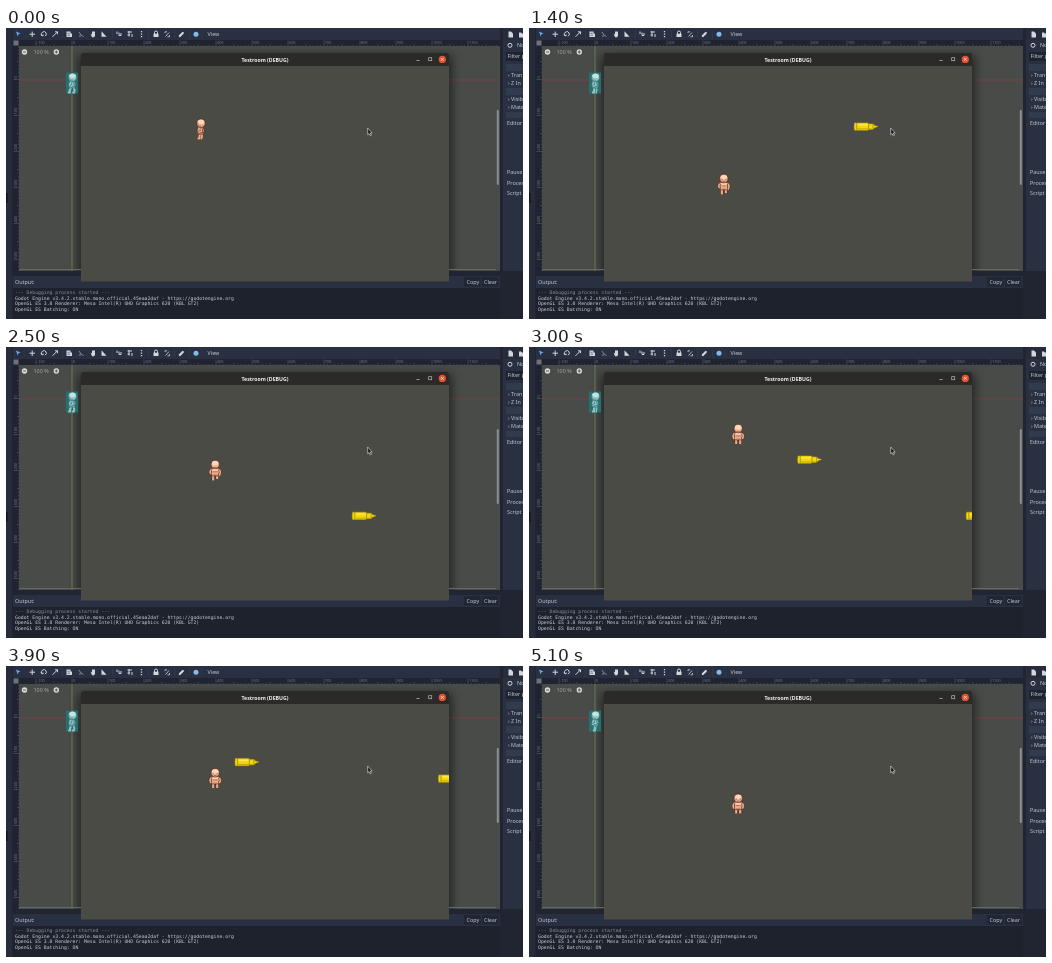
An HTML page that plays this animation: 517 px wide and 291 px high, repeating every 5.3 s.

```html
<!DOCTYPE html>
<html lang="en">
<head>
<meta charset="utf-8">
<title>Debug run</title>
<style>
  html, body { margin: 0; width: 100%; height: 100%; overflow: hidden; background: #202531; }
  svg { display: block; width: 517px; height: 291px; }
  text { font: 5.4px "Noto Sans", sans-serif; fill: #c4c8d0; white-space: pre; }
  .title { font-weight: 700; font-size: 5.2px; fill: #f4f4f2; text-anchor: middle; }
  .log text { font: 4.79px "DejaVu Sans Mono", monospace; fill: #c9ccd3; }
  .ruler text { font-size: 3.8px; fill: #747984; }
  .zoom { fill: #a3a6a4; }
  .icon { fill: none; stroke: #d3d6dc; stroke-width: 1; }
  .solid { fill: #d3d6dc; stroke: none; }
</style>
</head>
<body>
<svg viewBox="0 0 517 291">
  <defs>
    <filter id="blur" x="-20%" y="-20%" width="140%" height="140%"><feGaussianBlur stdDeviation="5"/></filter>
    <clipPath id="view"><rect x="13" y="18" width="481" height="225"/></clipPath>
    <clipPath id="game"><rect x="75" y="38" width="368" height="215.500"/></clipPath>
    <g id="bullet">
      <path d="M-11.500-3.600H1.500L3-2.600H7L8.500-1 12 0 8.500 1.200 7 2.800H3L1.500 3.700H-11.500Q-12.300 0-11.500-3.600Z" fill="#f2d80a" stroke="#c2a208" stroke-width=".5"/>
      <path d="M-8.500-1.700H1.500" stroke="#fff05c"/>
      <path d="M-8.500 2.400H6" stroke="#c7a60a"/>
      <path d="M-9.300-3.500V3.500M2.500-2.800V3M7-2.400V2.600" stroke="#9a8108" stroke-width=".7"/>
    </g>
  </defs>

  <rect width="517" height="291" fill="#202531"/>
  <rect width="6" height="291" fill="#262c3b"/>
  <rect y="165" width="1.500" height="10" fill="#11141b"/>
  <rect x="7" width="487" height="12" fill="#293042"/>

  <g class="icon">
    <path d="M10 3.500 14.500 5.500 12.500 6.300 11.700 8.500Z" fill="#6aa8ef" stroke="none"/>
    <path d="M23.500 6.200H29M26.200 3.500V9"/>
    <path d="M36 7.500A2.400 2.400 0 1 1 39 8.200M35 6.200 36 8 37.800 7"/>
    <path d="M46.500 8.800 51.500 3.800M49 3.800H51.500V6.200"/>
    <path class="solid" d="M60.500 3.500H64.500V5.500H66V9H60.500Z"/>
    <path d="M61.500 5.300H63.500M61.500 7.200H64" stroke="#293042" stroke-width=".6"/>
    <path d="M73 4 75 7 77.500 8.500M73 8H75" stroke="#858b98"/>
    <path class="solid" d="M84.500 5.500 86 6.500V3.500H89V8L88 9.300H86Z"/>
    <path class="solid" d="M95.500 3.300 100.500 8.800H95.500Z"/>
    <path d="M111 3.500V6M113 4.500V7.500H115V5"/>
    <path d="M121.500 4H126M121.500 7H124M123 3V8.500M126 6V9"/>
    <path d="M135.500 3V9.500" stroke-width="1.300" stroke-dasharray="1.300 1.200"/>
    <path d="M148.500 6V4.500A1.500 1.500 0 0 1 151.500 4.500V6"/>
    <rect class="solid" x="147.500" y="5.700" width="5" height="3.300"/>
    <path d="M159 5V3.800H161M163.500 7V8.800H161.500M159.500 8.500 163 4.500" stroke="#aeb3bd"/>
    <path d="M173.800 8 176.800 5" stroke-width="2.200" stroke-linecap="round"/>
    <circle cx="190" cy="6.200" r="2.500" fill="#87b9e8" stroke="none"/>
    <path d="M56.500 2V10M106.500 2V10M142.500 2V10M168.500 2V10M183.500 2V10M196 2V10" stroke="#363e50" stroke-width=".6"/>
  </g>
  <text x="201.500" y="8">View</text>

  <rect x="7" y="12" width="487" height="231" fill="#1f2430"/>
  <rect x="13" y="18" width="481" height="225" fill="#484b47"/>
  <g class="ruler" id="ruler"></g>
  <rect x="7.500" y="12.500" width="5" height="5" fill="#6c717b"/>
  <g clip-path="url(#view)">
    <path d="M13 52H494" stroke="#843f43" stroke-width=".8"/>
    <path d="M66 18V243" stroke="#737d50" stroke-width="1"/>
    <rect x="72" y="27" width="374" height="232" fill="#000" opacity=".5" filter="url(#blur)"/>
  </g>
  <g fill="#d9dbd9">
    <circle cx="18.500" cy="24" r="2.700"/><circle cx="50.300" cy="24" r="2.700"/>
  </g>
  <path d="M17 24H20M48.800 24H51.800M50.300 22.500V25.500" stroke="#3c3e3b" stroke-width=".8"/>
  <text class="zoom" x="27.500" y="26">100 %</text>
  <rect x="490.800" y="82" width="2" height="75" rx="1" fill="#8d9092"/>
  <path d="M13 241.500H490" stroke="#656864" stroke-width="1"/>
  <rect x="60" y="44.500" width="12" height="21" fill="#286f72"/>
  <g id="preview" transform="translate(66 55)"></g>

  <g id="inspector">
    <rect x="497" width="20" height="243" fill="#262c3b"/>
    <rect x="497" y="12" width="20" height="231" fill="#293042"/>
    <rect x="500" y="24" width="17" height="9" fill="#1e2330"/>
    <rect x="500" y="36" width="17" height="7" fill="#323a4e"/>
    <rect x="500" y="60" width="17" height="7" fill="#323a4e"/>
    <rect x="500" y="84" width="17" height="6" fill="#323a4e"/>
    <path class="solid" d="M502.500 3.500H505L507 5.500V9.500H502.500Z"/>
    <path class="solid" d="M513 4.500H515L516 5.500H517V9.500H513Z"/>
    <circle class="icon" cx="504" cy="17.300" r="2"/>
  </g>

  <rect x="7" y="248" width="487" height="43" fill="#293042"/>
  <rect x="7" y="260" width="487" height="31" fill="#1d222d"/>
  <rect x="458" y="249" width="16.500" height="9.500" fill="#202634"/>
  <rect x="476" y="249" width="16.500" height="9.500" fill="#202634"/>
  <text x="9" y="256">Output:</text>
  <text x="460.500" y="256">Copy</text>
  <text x="478" y="256">Clear</text>
  <g class="log" id="log"></g>

  <rect x="75" y="25" width="368" height="228.500" fill="#4b4b45"/>
  <path d="M75 38V27Q75 25 77 25H441Q443 25 443 27V38Z" fill="#2b2a29"/>
  <text class="title" x="259" y="33.500">Testroom (DEBUG)</text>
  <path d="M410.500 32.500H413.500" stroke="#b9b9b7" stroke-width=".8"/>
  <rect x="422.700" y="29.700" width="3" height="3" fill="none" stroke="#b9b9b7" stroke-width=".7"/>
  <circle cx="436.300" cy="31.400" r="3.600" fill="#e55430"/>
  <path d="M435 30.100 437.600 32.700M437.600 30.100 435 32.700" stroke="#fff" stroke-width=".7"/>
  <g clip-path="url(#game)">
    <g id="player"></g>
    <g id="shots"></g>
  </g>
  <path d="M361.700 100V106.700L363.100 105.500 364.200 107.900 365.300 107.400 364.300 105.100H366.200Z" fill="#171717" stroke="#e8e8e8" stroke-width=".6"/>
</svg>

<script>
const LOOP = 5300, STEP = 100, LAST = 5100;
const SHOT_SPEED = 0.182;
const $ = id => document.getElementById(id);

// time, x, y
const path = [
  [0, 194.5, 101], [650, 194.5, 101], [1660, 195, 175.5], [1800, 204, 171.2],
  [1900, 209.2, 166.3], [3075, 209.2, 82], [3470, 209.2, 82], [4260, 209.2, 138], [LOOP, 209.2, 138]
];
// time, view
const views = [[0, 'side'], [650, 'front'], [1850, 'back'], [3470, 'front']];
// time fired, x, y
const shots = [[617, 194.5, 98.5], [1604, 195, 168.8], [2608, 209.2, 112.5], [3726, 209.2, 96]];

const flesh = { skin: '#e9aa88', light: '#ffd8bb', shade: '#a9604c', line: '#4a231b' };
const pale = { skin: '#8fc4c3', light: '#c6e4df', shade: '#559a9c', line: '#286165' };

function labels(group, rows) {
  group.insertAdjacentHTML('beforeend',
    rows.map(([x, y, s]) => `<text x="${x}" y="${y}">${s}</text>`).join(''));
}

function buildRulers() {
  let marks = '', out = '';
  for (let i = -10; i <= 120; i++) {
    const x = 66 + i * 3.6, y = 51.5 + i * 3.6, major = i % 10 === 0;
    const len = major ? 5.5 : i % 5 ? 1 : 2;
    if (x > 13 && x < 494) marks += `M${x} 18v${-len}`;
    if (y > 18 && y < 243) marks += `M13 ${y}h${-len}`;
    if (!major) continue;
    if (x > 13 && x < 485) out += `<text x="${x + 1}" y="16">${i * 10}</text>`;
    if (y > 18 && y < 243) out += `<text transform="translate(11 ${y - 1}) rotate(-90)">${i * 10}</text>`;
  }
  $('ruler').innerHTML = `<path d="${marks}" stroke="#626873" stroke-width=".5"/>${out}`;
}

function buildText() {
  labels($('inspector'), [
    [511, 19, 'No'], [501.5, 30.3, 'Filter p'], [502, 49.4, '› Tran'], [502, 57.4, '› Z In'],
    [502, 73.2, '› Visib'], [502, 81.2, '› Mate'], [501, 97, 'Editor'],
    [501, 146, 'Pause'], [501, 156.5, 'Process'], [501, 167, 'Script']
  ]);
  labels($('log'), [
    [9, 266, '--- Debugging process started ---'],
    [9, 271.6, 'Godot Engine v3.4.2.stable.mono.official.45eaa2daf - https://godotengine.org'],
    [9, 277.2, 'OpenGL ES 3.0 Renderer: Mesa Intel(R) UHD Graphics 620 (KBL GT2)'],
    [9, 282.8, 'OpenGL ES Batching: ON']
  ]);
  $('log').firstChild.style.fill = '#878c98';
}

const stroke = (d, color, w) => `<path d="${d}" fill="none" stroke="${color}" stroke-width="${w}"/>`;
const limb = (d, c, w) => stroke(d, c.line, w + .8) + stroke(d, c.skin, w);
const shape = (d, c) => `<path d="${d}" fill="${c.skin}" stroke="${c.line}" stroke-width=".6"/>`;
const head = (x, c) =>
  `<ellipse cx="${x}" cy="-5.800" rx="4.200" ry="4.300" fill="${c.skin}" stroke="${c.line}" stroke-width=".6"/>` +
  `<ellipse cx="${x}" cy="-7" rx="3.200" ry="2.300" fill="${c.light}"/>`;

// swing runs from -1 to 1
function sideFigure(swing, c) {
  const s = swing * 1.2;
  return limb(`M1 4L${1.5 + s} 7 ${1 + s} 9.500h-2`, c, 2) +
    limb(`M-.5 4L${-1 - s} 7 ${-1 - s} 9.500h-2`, c, 2.2) +
    shape('M-2.500-2H2L3.800 1 2.800 5H-2.500L-3.500 2Z', c) +
    stroke('M2 0 2.500 4H-2', c.shade, 1.2) +
    limb(`M.5-.5L1 2.300 ${-2.500 + s} 3.500`, c, 1.8) +
    head(.5, c) + stroke('M-2.300-5.800v1.300M-2.500-2.800H1', c.shade, .9);
}

function walkFigure(view, swing, c) {
  const s = swing * .8;
  const face = view === 'back' ? 'M-2.500-2.600H2.500' : 'M-1.900-5.600v1.300M1.900-5.600v1.300M-1.300-2.900H1.300';
  return limb(`M-2 4V${9.5 + s}`, c, 2.2) + limb(`M2 4V${9.5 - s}`, c, 2.2) +
    shape('M-4.500-2H4.500L4 2 3.500 5.500H-3.500L-4 2Z', c) +
    limb(`M-4.300-.8L-5.200 2-4.200 ${4.6 - s}`, c, 1.7) +
    limb(`M4.300-.8L5.200 2 4.200 ${4.6 + s}`, c, 1.7) +
    stroke('M-2.500-.3H2.500', c.light, 1.5) + stroke('M-2.300 1.500H2.300M-1.800 4.800H1.800', c.shade, .7) +
    head(0, c) + stroke(face, c.shade, .9);
}

function positionAt(t) {
  const i = path.findIndex(p => p[0] > t);
  const [t0, x0, y0] = path[i - 1], [t1, x1, y1] = path[i];
  const k = (t - t0) / (t1 - t0);
  return { x: x0 + (x1 - x0) * k, y: y0 + (y1 - y0) * k, moving: x0 !== x1 || y0 !== y1 };
}

function draw(t) {
  const { x, y, moving } = positionAt(t);
  const view = views.filter(v => v[0] <= t).pop()[1];
  const swing = Math.round(Math.sin(t / 600 * Math.PI * 2));
  $('player').setAttribute('transform', `translate(${x} ${y})`);
  $('player').innerHTML = view === 'side'
    ? sideFigure(swing, flesh)
    : walkFigure(view, moving ? swing : 0, flesh);
  $('preview').innerHTML = sideFigure(Math.cos(t / 800 * Math.PI * 2), pale);
  $('shots').innerHTML = shots.filter(s => t >= s[0]).map(([t0, x0, y0]) =>
    `<use href="#bullet" x="${x0 + (t - t0) * SHOT_SPEED}" y="${y0}"/>`).join('');
}

buildRulers();
buildText();
draw(0);

const start = performance.now();
let shown = 0;
function tick() {
  const t = Math.max(0, performance.now() - start) % LOOP;
  const step = Math.min(LAST, Math.floor(t / STEP) * STEP);
  if (step !== shown) draw(shown = step);
  requestAnimationFrame(tick);
}
requestAnimationFrame(tick);
</script>
</body>
</html>
```
